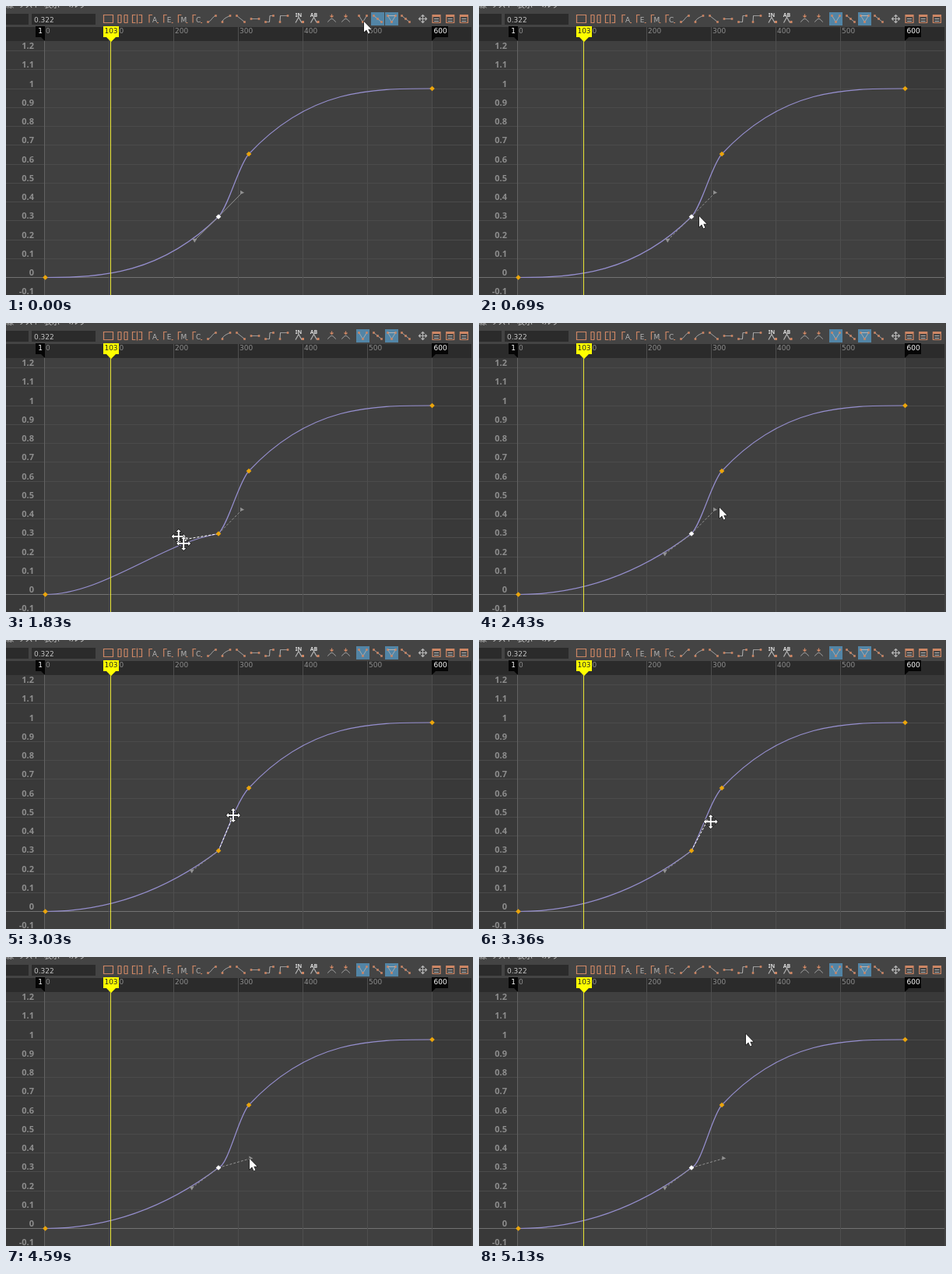
Recreate the animation shown at these times as an HTML page with a canvas. Size 600 by 371 pixels, loop 5280 ms.

```html
<!DOCTYPE html>
<html lang="ja">
<head>
<meta charset="utf-8">
<title>Graph editor tangents</title>
<style>
html, body { margin: 0; width: 100%; height: 100%; overflow: hidden; background: #404040; }
canvas { display: block; }
</style>
</head>
<body>
<canvas id="stage" width="600" height="371"></canvas>
<script>
const g = document.getElementById('stage').getContext('2d');
const LOOP = 5280, STEP = 30;
const ORANGE = '#cd8664', PALE = '#b4b4b4', GOLD = '#eba50c', DIM = '#8d8d8d';
const LABEL = '600 11px "Noto Sans", sans-serif';
const SMALL = '9px "DejaVu Sans", sans-serif';
const KEYS = [[50.5, 348.5], [273, 270.5], [312, 190], [547.5, 106]];
const KEY = KEYS[1], MID_SLOPE = 1.07, HANDLE = 43;

// Pointer moves: from time, to time, destination
const START = [460, 20];
const MOVES = [
  [150, 540, 283, 270], [720, 900, 242, 301], [1110, 1510, 212, 260], [1620, 1980, 238, 297],
  [2010, 2160, 314, 253], [2250, 2430, 309, 237], [2460, 2580, 303, 240], [2640, 3030, 292, 225],
  [3270, 3510, 310, 251], [4020, 4380, 313, 259], [4590, 5040, 343, 99]
];
const CLICK = 120, DRAG_IN = [900, 1995], DRAG_OUT = [2600, 4575];

const clamp = (v, a, b) => Math.min(Math.max(v, a), b);
const ease = u => u * u * (3 - 2 * u);
const within = (t, [a, b]) => t >= a && t < b;

function pointer(t) {
  return MOVES.reduce(([x, y], [from, to, tx, ty]) => {
    const e = ease(clamp((t - from) / (to - from), 0, 1));
    return [x + (tx - x) * e, y + (ty - y) * e];
  }, START);
}

// A handle follows the pointer one step late, only while it is dragged
function slopeAt(t, drag) {
  const [x, y] = pointer(clamp(t - STEP, ...drag));
  return (KEY[1] - y) / (x - KEY[0]);
}

function box(x, y, w, h, color) {
  g.fillStyle = color;
  g.fillRect(x, y, w, h);
}

function text(s, x, y, color, font, align = 'left') {
  g.font = font;
  g.textAlign = align;
  g.fillStyle = color;
  g.fillText(s, x, y);
}

function line(x1, y1, x2, y2, color, dash = []) {
  g.strokeStyle = color;
  g.lineWidth = 1;
  g.setLineDash(dash);
  g.beginPath();
  g.moveTo(x1, y1);
  g.lineTo(x2, y2);
  g.stroke();
  g.setLineDash([]);
}

// Draws a path with its origin at x, y
function shape(d, x, y, stroke, fill, scale = 1) {
  const p = new Path2D(d);
  g.save();
  g.translate(x, y);
  g.scale(scale, scale);
  g.lineWidth = 1.2;
  if (stroke) { g.strokeStyle = stroke; g.stroke(p); }
  if (fill) { g.fillStyle = fill; g.fill(p); }
  g.restore();
}

// Small icon: the graph of f over 0..1 with dots at the given places
function graphIcon(x, f, dots = [0, 1]) {
  const at = u => [x - 5 + 10 * u, 20.5 - 8 * f(u)];
  g.beginPath();
  for (let i = 0; i <= 20; i++) g.lineTo(...at(i / 20));
  g.strokeStyle = PALE;
  g.lineWidth = 1;
  g.stroke();
  for (const u of dots) {
    const [dx, dy] = at(u);
    box(dx - 1.3, dy - 1.3, 2.6, 2.6, ORANGE);
  }
}

function toolbar(broken) {
  box(0, 0, 600, 27, '#444444');
  text('線  リスト  表示  ヘルプ', 0, 2, '#c8c8c8', '10px "Noto Sans CJK JP", sans-serif');
  box(0, 10, 29, 14, '#2b2b2b');
  box(33, 10, 82, 14, '#2b2b2b');
  text('0.322', 36, 20.5, '#c4c4c4', SMALL);
  box(broken ? 450 : 469, 8, 17, 17, '#5285a6');
  box(487, 8, 17, 17, '#5285a6');

  ['M-6-5H6V5H-6Z', 'M-2-5H-6V5H-2M2-5H6V5H2M-2-5V5M2-5V5', 'M-2-5H-6V5H-2M2-5H6V5H2M0-6V6']
    .forEach((d, i) => shape(d, 131.5 + i * 18.5, 16.5, ORANGE));

  [...'AEMC'].forEach((s, i) => {
    const x = 190 + i * 18.7;
    shape('M-6 5V-5H-2M4 5H6', x, 16.5, ORANGE);
    text(s, x + 1, 20.5, PALE, SMALL, 'center');
  });

  const linear = u => 1 - u, vee = u => Math.abs(2 * u - 1);
  [ease, Math.sqrt, linear, () => .5, u => +(u > .5), u => +(u > 0)]
    .forEach((f, i) => graphIcon(264.5 + i * 18.5, f));

  ['IN', 'AB'].forEach((s, i) => {
    const x = 376 + i * 19.5;
    text(s, x, 14, '#dddddd', '600 7px "Noto Sans", sans-serif', 'center');
    shape('M-4 5L0-2 4 5', x, 16.5, PALE);
    box(x + 4, 19, 3, 3, ORANGE);
  });
  for (const x of [418.5, 436.5]) {
    graphIcon(x, u => Math.sin(u * Math.PI) / 2, []);
    shape('M0-6V-2M-2-4L0-2 2-4', x, 16.5, ORANGE);
  }

  const middle = [0, .5, 1];
  graphIcon(458.5, vee, middle);
  graphIcon(477.5, linear, middle);
  graphIcon(495.5, vee, middle);
  line(491, 12.5, 500, 12.5, PALE);
  graphIcon(513.5, linear, middle);

  shape('M-5 0H5M0-5V5M-2-3L0-5 2-3M-2 3L0 5 2 3M-3-2L-5 0-3 2M3-2L5 0 3 2', 535.5, 16.5, PALE);
  for (let x = 553; x < 590; x += 17.7) {
    shape('M-5-5H5V5H-5Z', x, 16.5, ORANGE);
    box(x - 5, 11, 10, 3, ORANGE);
    shape('M-3 0H3M-3 3H3', x, 16.5, PALE);
  }
}

function grid() {
  box(0, 27, 600, 18, '#2b2b2b');
  box(0, 45, 600, 326, '#393939');
  box(50, 45, 498, 326, '#404040');
  for (let i = -1; i <= 12; i++) {
    const y = Math.round(348 - i * 24.25) + .5;
    line(0, y, 600, y, i ? '#4b4b4b' : '#727272');
    text(String(i / 10), 36, y - 2.5, DIM, LABEL, 'right');
  }
  for (let i = 0; i <= 6; i++) {
    const x = 49.5 + i * 83;
    line(x, 27, x, 371, i ? '#4e4e4e' : '#626262');
    if (i < 6) text(String(i * 100), x + 1.5, 34.5, DIM, SMALL);
  }
  box(598, 27, 2, 344, '#444444');
}

function markers() {
  shape('M-12 0H0V19L-5 14H-12Z', 50, 26, null, '#050505');
  text('1', 44, 34.5, '#ffffff', SMALL, 'center');
  shape('M0 0H21V14H5L0 19Z', 547, 26, null, '#050505');
  text('600', 549.5, 34.5, '#ffffff', SMALL);
  line(134.5, 44, 134.5, 371, '#ece737');
  shape('M-10 0H10V14H6L0 20-6 14H-10Z', 135, 26, null, '#ffff00');
  text('103', 135, 34.5, '#222222', SMALL, 'center');
}

function curve(sIn, sOut) {
  const slopes = [[0, 0], [sIn, sOut], [MID_SLOPE, MID_SLOPE], [0, 0]];
  g.beginPath();
  g.moveTo(...KEYS[0]);
  for (let i = 1; i < 4; i++) {
    const [x0, y0] = KEYS[i - 1], [x1, y1] = KEYS[i], d = (x1 - x0) / 3;
    g.bezierCurveTo(x0 + d, y0 - d * slopes[i - 1][1], x1 - d, y1 + d * slopes[i][0], x1, y1);
  }
  g.strokeStyle = '#968fcf';
  g.lineWidth = 1.2;
  g.stroke();
}

function handle(slope, side, active, broken) {
  const [x, y] = KEY, k = side * HANDLE / Math.hypot(1, slope);
  const tx = x + k, ty = y - k * slope, color = active ? '#ffffff' : '#929292';
  line(x, y, tx, ty, color, broken ? [3, 2] : []);
  shape(side < 0 ? 'M-3-2H3L0 3Z' : 'M-2-3L3 0-2 2Z', tx, ty, null, color);
}

function diamonds(selected) {
  for (const key of KEYS)
    shape('M0-3.3L3.3 0 0 3.3-3.3 0Z', ...key, null, key === KEY && selected ? '#ffffff' : GOLD);
}

function arrowCursor(x, y) {
  shape('M0 0V15L3.5 11.7 6 17.2 8.3 16.2 5.9 10.9H10.6Z', x, y, '#111111', '#ffffff', .9);
}

function moveCursor(x, y) {
  shape('M-9 0L-6-3V-1H-1V-6H-3L0-9 3-6H1V-1H6V-3L9 0 6 3V1H1V6H3L0 9-3 6H-1V1H-6V3Z',
    x, y, '#111111', '#ffffff');
}

function draw(t) {
  const sIn = slopeAt(t, DRAG_IN), sOut = slopeAt(t, DRAG_OUT);
  const [x, y] = pointer(t), [px, py] = pointer(t - 2 * STEP);
  const broken = t >= CLICK, dragIn = within(t, DRAG_IN), dragOut = within(t, DRAG_OUT);
  const dragging = dragIn || dragOut;
  grid();
  toolbar(broken);
  curve(sIn, sOut);
  handle(sIn, -1, dragIn, broken);
  handle(sOut, 1, dragOut, broken);
  diamonds(!dragging);
  markers();
  // Fast drags leave the late pointer visible
  if (dragging && Math.hypot(x - px, y - py) > 9) moveCursor(px, py);
  (dragging ? moveCursor : arrowCursor)(x, y);
}

const start = performance.now();
function tick() {
  const t = (performance.now() - start) % LOOP;
  draw(Math.floor(t / STEP) * STEP);
  requestAnimationFrame(tick);
}
tick();
</script>
</body>
</html>
```
